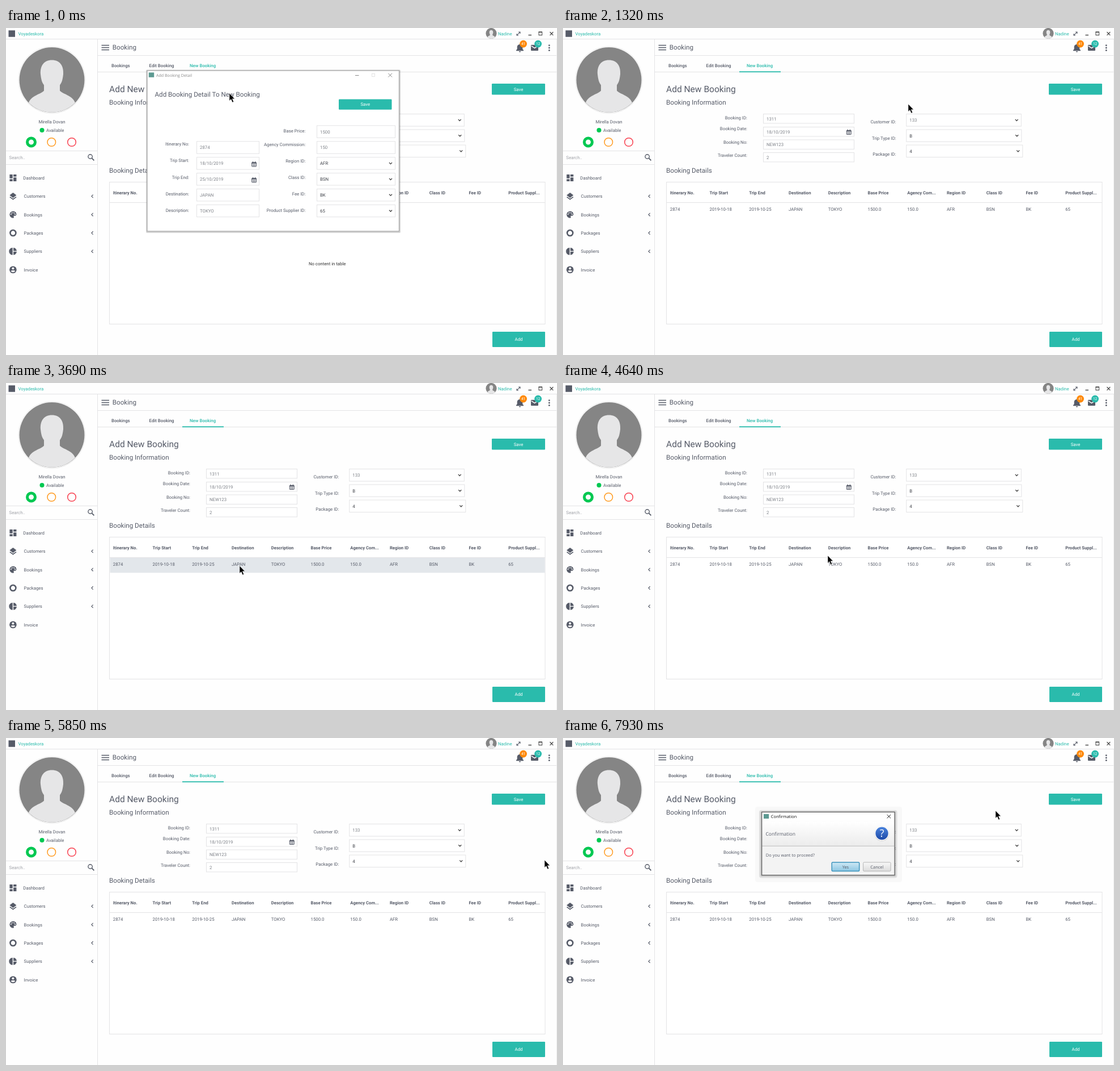
An HTML page for the animation above (8000 ms loop, 972x576 px).

```html
<!DOCTYPE html>
<html lang="en">
<head>
<meta charset="utf-8">
<title>Booking</title>
<style>
  html, body { margin: 0; width: 100%; height: 100%; overflow: hidden; background: #fff; }
  svg { display: block; width: 100vw; height: 100vh; }
  text { font: 7.8px Roboto, sans-serif; fill: #5a5e69; text-rendering: geometricPrecision; white-space: pre; }
  .win text { font-family: "Open Sans", "Noto Sans", sans-serif; fill: #222; }
</style>
</head>
<body>
<svg id="stage" viewBox="0 0 972 576" xmlns="http://www.w3.org/2000/svg"></svg>
<script>
const LOOP = 8000;
const TEAL = '#2abbac', INK = '#565b68', LINE = '#e3e3e5', GREY = '#7d8087', DARK = '#3c3f46';

// Markup helpers
const rect = (x, y, w, h, fill, more = '') =>
  `<rect x="${x}" y="${y}" width="${w}" height="${h}" fill="${fill}" ${more}/>`;
const circle = (x, y, r, fill, more = '') =>
  `<circle cx="${x}" cy="${y}" r="${r}" fill="${fill}" ${more}/>`;
const ring = (x, y, r, color, width) =>
  circle(x, y, r, 'none', `stroke="${color}" stroke-width="${width}"`);
const path = (d, fill, more = '') => `<path d="${d}" fill="${fill}" ${more}/>`;
const stroke = (d, color, width = 1) => path(d, 'none', `stroke="${color}" stroke-width="${width}"`);
const text = (x, y, s, { size = 7.8, fill = INK, anchor = 'start', weight = 400, more = '' } = {}) =>
  `<text x="${x}" y="${y}" text-anchor="${anchor}" style="font-size:${size}px;font-weight:${weight};fill:${fill};${more}">${s}</text>`;
const group = (id, body, more = '') => `<g id="${id}" ${more}>${body}</g>`;
const at = (x, y, body, scale = 1) => `<g transform="translate(${x} ${y}) scale(${scale})">${body}</g>`;

const label = (x, y, s) => text(x, y, s, { anchor: 'end' });
const box = (x, y, w, h) => rect(x + .5, y + .5, w - 1, h - 1, '#fff', `stroke="${LINE}"`);
const field = (x, y, w, h, s, fill = GREY) => box(x, y, w, h) + text(x + 6, y + h / 2 + 2.9, s, { fill });
const chevron = (x, y) => stroke(`M${x - 2.5} ${y - 1.4}l2.5 2.6 2.5 -2.6`, '#444', 1.3);
const select = (x, y, w, h, s, fill = DARK) => field(x, y, w, h, s, fill) + chevron(x + w - 8.5, y + h / 2);
const button = (x, y, w, h, s) => rect(x, y, w, h, TEAL, 'rx="1.2"') +
  text(x + w / 2, y + h / 2 + 2.8, s, { fill: '#fff', anchor: 'middle' });
const focusRing = (id, x, y, w, h) =>
  group(id, rect(x + .6, y + .6, w - 1.2, h - 1.2, 'none', 'rx="1.2" stroke="#14645c" stroke-width="1.3"'));
const calendar = (x, y) => at(x, y,
  rect(-4, -3, 8, 7, 'none', `rx=".6" stroke="${INK}"`) + rect(-4, -3.4, 8, 2.2, INK) +
  stroke('M-2 -5v2.4M2 -5v2.4', INK, 1.2) + stroke('M-3 .6h6M-3 2.4h6M-1.4 -1v5M1.4 -1v5', INK, .6));

const person = (x, y, r) => at(x, y,
  circle(0, 0, 57.5, '#858585') +
  path('M-41 40C-36 27 -19 25 -14 19V9C-18 4 -19 -2 -20 -10C-21 -25 -14 -35 0 -35S21 -25 20 -10C19 -2 18 4 14 9V19C19 25 36 27 41 40A57.5 57.5 0 0 1 -41 40Z', '#e6e6e7'), r / 57.5);

const tiles = path('M0 0h5.3v6.8h-5.3zM0 8.2h5.3v3.8h-5.3zM6.7 0h5.3v3.8h-5.3zM6.7 5.2h5.3v6.8h-5.3z', INK);
const icons = [
  at(-6, -6, tiles),
  path('M0 -6.3L6 -1.8 0 2.8 -6 -1.8Z', INK) + stroke('M-5.6 1.2L0 5.4 5.6 1.2', INK, 1.6),
  path('M0 -6A6 6 0 1 0 0 6C1.6 6 1.8 4.7 1.2 3.8C.6 2.6 1.4 2 2.6 2H4C5.4 2 6 .6 6 -.6C6 -3.8 3.4 -6 0 -6Z', INK) +
    [[-3.5, -.6], [-1.7, -3.2], [1.7, -3.2], [3.6, -.6]].map(p => circle(...p, 1, '#fff')).join(''),
  ring(0, 0, 5, INK, 2.6),
  path('M-.7 -6.4V6.4A6.4 6.4 0 0 1 -.7 -6.4ZM.7 -6.4A6.4 6.4 0 0 1 6.5 -.7H.7ZM.7 .7H6.5A6.4 6.4 0 0 1 .7 6.4Z', INK),
  circle(0, 0, 6.3, INK) + circle(0, -2.2, 2, '#fff') + path('M-3.8 2.6C-3 .9 3 .9 3.8 2.6C2.4 5 -2.4 5 -3.8 2.6Z', '#fff')
];

function sidebar() {
  const names = ['Dashboard', 'Customers', 'Bookings', 'Packages', 'Suppliers', 'Invoice'];
  const menu = names.map((name, i) => {
    const y = 264 + 32.35 * i;
    const arrow = i > 0 && i < 5 ? stroke(`M153.6 ${y - 2.8}l-2.7 2.8 2.7 2.8`, INK, 1.2) : '';
    return at(12.4, y, icons[i]) + text(i ? 31.6 : 30.3, y + 3, name) + arrow;
  });
  return ring(81, 91.5, 59, '#e4e4e4', .8) + person(81, 91.5, 57.5) +
    text(81, 167.7, 'Mirella Dovan', { anchor: 'middle' }) +
    circle(63.5, 180, 4, '#00c851') + text(71, 182.8, 'Available') +
    ring(44.5, 201, 7, '#00c851', 5) + ring(80.3, 201, 7.3, '#ff9a1f', 1.5) + ring(116, 201, 7.3, '#f8404f', 1.5) +
    stroke('M0 216.5H161M0 240.5H161', LINE) + text(5.5, 231.3, 'Search..', { fill: '#a0a2a8' }) +
    ring(148.6, 226.5, 3.7, INK, 1.4) + stroke('M151.2 229.2L155.4 233.4', INK, 1.8) +
    menu.join('') + stroke('M161.5 20V576', LINE);
}

function header() {
  const bell = path('M-6.5 5.2V4L-4.8 2.3V-1.5C-4.8 -4 -3.2 -5.4 -1 -5.9V-6.6H1V-5.9C3.2 -5.4 4.8 -4 4.8 -1.5V2.3L6.5 4V5.2ZM-1.6 6H1.6A1.6 1.6 0 0 1 -1.6 6Z', INK);
  const badge = (x, s, fill) => circle(x, 28, 6.4, fill) + text(x, 30.3, s, { size: 6.6, fill: '#fff', anchor: 'middle' });
  return rect(4.5, 4.2, 11.5, 11.5, INK) + text(21.5, 12.8, 'Voyadeskora', { fill: TEAL }) +
    person(856, 9.5, 9.6) + text(868, 12.8, 'Nadine', { fill: TEAL }) +
    stroke('M901.6 12.4L906.4 7.6M904 7H907V10M901 10V13H904', INK, 1.1) +
    stroke('M921.5 12.5H927', '#444', 1.4) + rect(940, 7.2, 5.6, 5.4, 'none', 'stroke="#444"') + stroke('M939.5 7.2H946', '#444', 1.6) +
    stroke('M959.5 7L965.3 12.8M965.3 7L959.5 12.8', '#444', 1.2) +
    stroke('M0 19.5H972M162 48.5H972M162 77.5H972', LINE) + stroke('M971.5 20V576', '#ededee') +
    stroke('M168.5 30.5H182M168.5 34.5H182M168.5 38.5H182', INK, 1.4) + text(187.8, 38.2, 'Booking', { size: 11.65 }) +
    at(906.5, 35, bell) + badge(912.6, '41', '#ff8a0a') +
    rect(926, 29.8, 13, 10.2, INK, 'rx="1"') + stroke('M926.8 31.6L932.5 35.4 938.2 31.6', '#fff', 1.3) + badge(938.6, '12', TEAL) +
    [30.6, 35, 39.4].map(y => circle(958.3, y, 1.4, INK)).join('') +
    text(186, 68.7, 'Bookings', { weight: 500 }) + text(252.6, 68.7, 'Edit Booking', { weight: 500 }) +
    text(324, 68.7, 'New Booking', { weight: 500, fill: TEAL }) + rect(311, 76.3, 73, 1.8, TEAL);
}

function form() {
  const rows = [['Booking ID:', '1311', 161, 151], ['Booking Date:', '18/10/2019', 179.6, 174],
    ['Booking No:', 'NEW123', 203.8, 196.5], ['Traveler Count:', '2', 227.4, 219]];
  return text(182, 113, 'Add New Booking', { size: 15.55 }) + button(857, 98, 94, 19.4, 'Save') +
    focusRing('saveFocus', 857, 98, 94, 19.4) +
    text(182, 134.8, 'Booking Information', { size: 11.65 }) + text(182, 254.7, 'Booking Details', { size: 11.65 }) +
    rows.map(([name, value, ly, y]) => label(325, ly, name) + field(353, y, 161, 17.4, value)).join('') + calendar(504.3, 183.6) +
    label(587.5, 168.4, 'Customer ID:') + select(605.3, 151, 203.5, 22.5, '133', GREY) +
    label(587.7, 197, 'Trip Type ID:') + select(605.3, 178.5, 204, 22.2, 'B') +
    label(587.3, 225.4, 'Package ID:') + select(605.3, 205.6, 206, 22.4, '4');
}

function table() {
  const heads = ['Itinerary No.', 'Trip Start', 'Trip End', 'Destination', 'Description', 'Base Price',
    'Agency Com...', 'Region ID', 'Class ID', 'Fee ID', 'Product Suppl...'];
  const cells = ['2874', '2019-10-18', '2019-10-25', 'JAPAN', 'TOKYO', '1500.0', '150.0', 'AFR', 'BSN', 'BK', '65'];
  const line = (list, y, style) => list.map((s, i) => text(188.8 + 69.74 * i, y, s, style)).join('');
  return box(182, 271, 769.5, 251) + stroke('M183 307.5H951', LINE) + line(heads, 292.8, { weight: 700, size: 7.7 }) +
    group('rowHover', rect(183.5, 308, 767, 26.3, '#e3e7eb')) + group('row', line(cells, 322.3)) +
    group('empty', text(566.7, 417.8, 'No content in table', { anchor: 'middle', fill: '#333' })) +
    button(858, 535, 93, 27, 'Add');
}

function detailDialog() {
  const step = 27.9;
  const left = [['Itinerary No:', '2874'], ['Trip Start:', '18/10/2019'], ['Trip End:', '25/10/2019'],
    ['Destination:', 'JAPAN'], ['Description:', 'TOKYO']];
  const right = [['Base Price:', '1500'], ['Agency Commission:', '150'], ['Region ID:', 'AFR'],
    ['Class ID:', 'BSN'], ['Fee ID:', 'BK'], ['Product Supplier ID:', '65']];
  const leftSide = left.map(([name, value], i) =>
    label(323, 207 + 29.25 * i, name) + field(336, 199.3 + step * i, 111, 22.4, value)).join('');
  const rightSide = right.map(([name, value], i) =>
    label(528.3, i ? 208 + 29.1 * (i - 1) : 184.3, name) +
    (i < 2 ? field : select)(548, 171.4 + step * i, 139, 22.4, value, i < 2 ? GREY : DARK)).join('');
  const chrome = (id, ink, faint, edge) => group(id,
    text(265, 85.6, 'Add Booking Detail', { size: 7.1, fill: ink }) + stroke('M616 83.5H622.5', ink) +
    rect(645.5, 80.5, 5, 5, 'none', `stroke="${faint}" stroke-width=".8"`) +
    stroke('M674.3 79.8L681 86.5M681 79.8L674.3 86.5', ink) +
    rect(249, 75, 444.5, 283, 'none', `stroke="${edge}" stroke-width="1.2"`), 'class="win"');
  return group('detailHalo', rect(242, 69, 458, 296, '#000', 'rx="7" opacity=".055"') + rect(246, 72, 451, 290, '#000', 'rx="4" opacity=".06"')) +
    group('detailShade', rect(247, 73.5, 449, 287.5, '#000', 'rx="2" opacity=".16"')) +
    rect(249, 75, 444.5, 283, '#fff') + rect(251.8, 78.4, 9.4, 8.4, '#5d9a92') +
    chrome('idle', '#888', '#ddd', '#a4a4a4') + chrome('active', '#111', '#bbb', '#4c4c4c') +
    text(262.5, 121.3, 'Add Booking Detail To New Booking', { size: 11.65 }) +
    button(587, 125.5, 93.5, 18.3, 'Save') + focusRing('detailFocus', 587, 125.5, 93.5, 18.3) +
    leftSide + calendar(437.6, 240) + calendar(437.6, 267.9) + rightSide;
}

function confirmDialog() {
  const push = (x, s, fill, edge, width) =>
    rect(x, 219, 48.5, 15.6, fill, `rx="1.5" stroke="${edge}" stroke-width="${width}"`) +
    text(x + 24.2, 229.7, s, { size: 7.45, anchor: 'middle' });
  return group('confirmHalo', rect(339, 121, 259, 133, '#000', 'rx="4" opacity=".022"') +
      rect(346, 127, 243.5, 119.5, '#000', 'rx="4" opacity=".1"') + rect(348.5, 129, 238.5, 115, '#000', 'rx="2" opacity=".14"')) +
    `<g class="win">` + rect(350.7, 130.5, 234.3, 111, '#f3f3f3') + rect(351, 131, 233.5, 15.5, '#fff') +
    rect(351, 146.5, 233.5, 43.5, 'url(#pane)') + stroke('M351 190.3H584.5', '#bdbdbd') +
    rect(350.7, 130.5, 234.3, 111, 'none', 'stroke="#555" stroke-width="1.1"') +
    rect(354, 134, 9.2, 8, '#5d9a92') + text(366.8, 140.8, 'Confirmation', { size: 7.4, fill: '#111' }) +
    stroke('M571.6 135L578 141.4M578 135L571.6 141.4', '#222') +
    text(357.5, 171.6, 'Confirmation', { size: 8.5 }) + text(357.8, 209, 'Do you want to proceed?', { size: 7.45 }) +
    circle(562.5, 168.6, 13, '#c9c9cc') + circle(562.5, 168, 12.6, '#fff') + circle(562.5, 168, 11.2, 'url(#blue)') +
    text(562.5, 174.3, '?', { size: 18, fill: '#fff', anchor: 'middle', more: 'font-family:"Noto Serif",serif' }) +
    push(474.2, 'Yes', 'url(#yes)', '#3c94bd', 1.5) + push(529.6, 'Cancel', 'url(#plain)', '#b5b5b5', 1) + '</g>';
}

const gradient = (id, top, bottom) =>
  `<linearGradient id="${id}" x2="0" y2="1"><stop stop-color="${top}"/><stop offset="1" stop-color="${bottom}"/></linearGradient>`;
const arrow = path('M0 0V13.2L3 10.5 5.3 16 7.6 15 5.3 9.7H9.4Z', '#000', 'stroke="#fff" stroke-width=".5"');
const hand = path('M3.2 9.4V1.6C3.2 .2 5.2 .2 5.2 1.6V5.6C5.6 4.8 7 4.9 7.2 6C7.6 5.3 9 5.5 9.1 6.5C9.7 5.9 11 6.2 11 7.4V10.6C11 12.4 9.9 13 9.9 15H4.3C4.3 13.2 1.6 11.4 .7 9.2C.2 7.9 1.6 7.3 2.4 8.3Z', '#fff', 'stroke="#111" stroke-width=".9"') +
  stroke('M5.2 5.6V8.4M7.2 6V8.6M9.1 6.5V8.8', '#111', .7);

const stage = document.getElementById('stage');
stage.innerHTML = '<defs>' + gradient('pane', '#ffffff', '#ececec') + gradient('blue', '#4b83dc', '#1d4aa8') +
  gradient('yes', '#cfe9f5', '#8cc6e2') + gradient('plain', '#f8f8f8', '#dcdcdc') + '</defs>' +
  rect(0, 0, 972, 576, '#fefefe') + sidebar() + header() + form() + table() +
  group('detail', detailDialog()) + group('confirm', confirmDialog()) +
  group('pointer', group('arrow', arrow) + group('hand', hand));

const part = Object.fromEntries([...stage.querySelectorAll('g[id]')].map(g => [g.id, g]));

// Pointer hops: first step, last step, number of steps, x, y
const hops = [
  [120, 360, 3, 503, 127], [510, 630, 2, 596, 141], [750, 750, 1, 608, 135], [900, 900, 1, 609, 134],
  [1850, 1970, 2, 291, 242], [2120, 2250, 2, 211, 311], [2370, 2370, 1, 202, 320], [2510, 2630, 2, 335, 320],
  [2780, 2900, 2, 458, 318], [3050, 3290, 3, 415, 316], [3440, 3560, 2, 394, 316], [3690, 3690, 1, 412, 322],
  [3830, 3830, 1, 430, 304], [3980, 3980, 1, 369, 316], [4130, 4370, 3, 514, 329], [4490, 4490, 1, 480, 316],
  [4640, 4640, 1, 467, 304], [4790, 4790, 1, 456, 317], [4940, 4940, 1, 520, 326], [5060, 5060, 1, 581, 320],
  [5220, 5220, 1, 617, 317], [5370, 5850, 5, 950, 215], [5980, 5980, 1, 948, 134], [6120, 6120, 1, 923, 103],
  [6400, 6520, 2, 924, 107], [7930, 7930, 1, 763, 128]
];

function pointerAt(t) {
  let x = 394, y = 115;
  for (const [start, end, steps, tx, ty] of hops) {
    if (t < start) break;
    const gap = (end - start) / (steps - 1) || 1;
    const k = Math.min(steps, Math.floor((t - start) / gap + 1.02)) / steps;
    x += (tx - x) * k;
    y += (ty - y) * k;
  }
  return [x, y];
}

function render(t) {
  const within = (a, b) => t >= a && t < b;
  const show = (id, on) => part[id].setAttribute('display', on ? 'inline' : 'none');
  const fade = (id, value) => part[id].setAttribute('opacity', value);

  show('detail', t < 1320);
  fade('detail', t < 1170 ? 1 : .5);
  show('idle', t < 1050);
  show('active', t >= 1050);
  show('detailShade', t < 1050);
  show('detailHalo', within(1050, 1170));
  show('detailFocus', within(630, 1320));

  show('empty', t < 1320);
  show('row', t >= 1320);
  show('rowHover', within(2370, 4640) || within(4790, 5370));

  show('saveFocus', within(6120, 7330));
  show('confirm', t >= 7330);
  fade('confirm', t < 7460 ? .5 : 1);
  show('confirmHalo', t >= 7610);

  const pressing = within(630, 1320) || within(6120, 7930);
  show('hand', pressing);
  show('arrow', !pressing);
  part.pointer.setAttribute('transform', `translate(${pointerAt(t).join(' ')})`);
}

function tick() {
  render(performance.now() % LOOP);
  requestAnimationFrame(tick);
}
tick();
</script>
</body>
</html>
```
